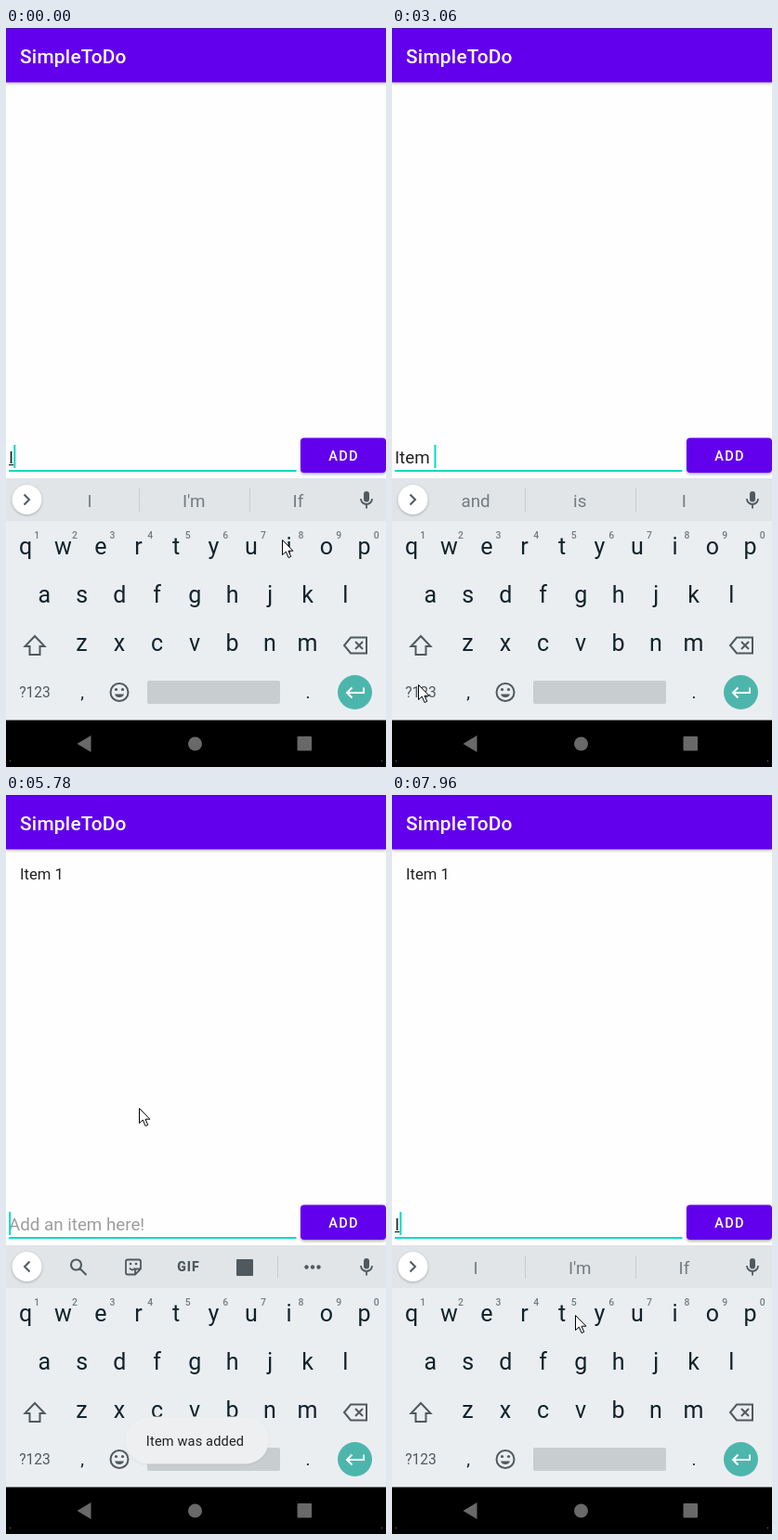
Recreate the animation shown at these times as an HTML page with a canvas. Size 409 by 796 pixels, loop 8000 ms.

```html
<!DOCTYPE html>
<html lang="en">
<head>
<meta charset="utf-8">
<title>To-do list</title>
<style>
html, body { margin: 0; width: 100%; height: 100%; overflow: hidden; background: #fefefe; }
canvas { display: block; width: 409px; height: 796px; }
</style>
</head>
<body>
<canvas id="stage" width="409" height="796"></canvas>
<script>
const ctx = document.getElementById('stage').getContext('2d');
const LOOP = 8000;
const PURPLE = '#6200ee', TEAL = '#03dac5', INK = '#11232a', ICON = '#50595e', MUTED = '#747b7f';
const FIELD_X = 3, STEP = 40.5;

const BURSTS = [[0, 1140, 10], [1290, 2190, 8], [2340, 3060, 6], [3180, 3330, 2],
  [3450, 3960, 5], [4110, 4350, 3], [4500, 5350, 7], [5780, 5780, 1],
  [6090, 6870, 7], [7020, 7020, 1], [7170, 7410, 3], [7690, 7960, 3]];
const TICKS = BURSTS.flatMap(([a, b, n]) =>
  Array.from({ length: n }, (_, i) => n > 1 ? a + (b - a) * i / (n - 1) : a));

// Input events: time, field text, suggestions (null shows the toolbar), key layout.
const EVENTS = [
  [0, 'I', ['I', "I'm", 'If'], 'lower'],
  [480, 'It', ['It', "It's", 'Its'], 'lower'],
  [860, 'Ite', ['Ite', '*It', "It's"], 'lower'],
  [1540, 'Item', ['Item', 'Items', "Item's"], 'lower'],
  [2050, 'Item ', ['and', 'is', 'I'], 'lower'],
  [3180, 'Item ', ['and', 'is', 'I'], 'symbols'],
  [3700, 'Item 1', [], 'symbols'],
  [4780, '', null, 'lower'],
  [7020, '', null, 'upper'],
  [7690, 'I', ['I', "I'm", 'If'], 'lower']
];
const ADDED = 4780;

const POINTER = [
  [0, 297, 551], [120, 290, 552], [400, 180, 556], [520, 180, 556], [800, 98, 556],
  [960, 98, 556], [1140, 190, 563], [1290, 303, 634], [1440, 322, 656], [1600, 322, 656],
  [1950, 225, 708], [2190, 225, 708], [2800, 28, 712], [3060, 28, 707], [3180, 28, 707],
  [3330, 25, 690], [3450, 23, 643], [3600, 19, 557], [3960, 19, 557], [4350, 335, 452],
  [4500, 355, 455], [4830, 355, 455], [5350, 143, 337], [5780, 143, 337],
  [6480, 32, 664], [7020, 32, 664], [7410, 294, 553], [7690, 294, 553], [7960, 197, 560]
];

const clamp = v => Math.max(0, Math.min(1, v));
const latest = (list, t, key = v => v) => list.filter(v => key(v) <= t).pop();

function pointerAt(t) {
  const i = POINTER.findIndex(p => p[0] > t);
  if (i < 0) return POINTER[POINTER.length - 1].slice(1);
  const [t0, x0, y0] = POINTER[i - 1], [t1, x1, y1] = POINTER[i];
  const u = (t - t0) / (t1 - t0), e = u * u * (3 - 2 * u);
  return [x0 + (x1 - x0) * e, y0 + (y1 - y0) * e];
}

function rect(x, y, w, h, color, r = 0) {
  ctx.fillStyle = color;
  ctx.beginPath();
  ctx.roundRect(x, y, w, h, r);
  ctx.fill();
}
function disc(x, y, r, color) {
  ctx.fillStyle = color;
  ctx.beginPath();
  ctx.arc(x, y, r, 0, Math.PI * 2);
  ctx.fill();
}
function text(s, x, y, size, color, { weight = 400, align = 'center', spacing = 0 } = {}) {
  ctx.font = `${weight} ${size}px Roboto, sans-serif`;
  ctx.letterSpacing = spacing + 'px';
  ctx.textAlign = align;
  ctx.fillStyle = color;
  ctx.fillText(s, x, y);
}
// Draws an SVG path relative to (x, y).
function shape(d, x, y, { fill, stroke, width = 2 } = {}) {
  const path = new Path2D(d);
  ctx.save();
  ctx.translate(x, y);
  if (fill) { ctx.fillStyle = fill; ctx.fill(path); }
  if (stroke) { ctx.strokeStyle = stroke; ctx.lineWidth = width; ctx.stroke(path); }
  ctx.restore();
}
function withShadow(color, blur, dy, draw) {
  ctx.save();
  ctx.shadowColor = color;
  ctx.shadowBlur = blur;
  ctx.shadowOffsetY = dy;
  draw();
  ctx.restore();
}

function drawApp(t, state) {
  rect(0, 0, 409, 796, '#fefefe');
  withShadow('rgba(0,0,0,.25)', 3, 1, () => rect(0, 0, 409, 58.5, PURPLE));
  rect(0, 0, 409, 1, '#4b12b0');
  text('SimpleToDo', 15, 38, 20.83, '#fff', { weight: 500, align: 'left', spacing: 0.26 });
  if (t >= ADDED) text('Item 1', 15, 91, 16.66, '#212121', { align: 'left' });

  const [since, value] = state;
  text(value || 'Add an item here!', FIELD_X, 469, 18.75, value ? '#212121' : '#9d9d9d', { align: 'left' });
  const end = FIELD_X + ctx.measureText(value).width;
  if (value && !/[ 1]/.test(value)) rect(FIELD_X, 470, end - FIELD_X, 1.2, '#212121');
  rect(FIELD_X, 476, 309.5, 2, TEAL);
  const blinkStart = value === '' ? ADDED : since;
  if ((t - blinkStart) % 1000 < 500) rect(end + 0.2, 449, 2, 25, TEAL);

  withShadow('rgba(0,0,0,.35)', 3, 1.5, () => rect(317, 441.5, 92, 37.5, PURPLE, 4));
  text('ADD', 363.5, 466, 14.58, '#fff', { weight: 500, spacing: 1.3 });
}

function drawToolbar() {
  ctx.strokeStyle = ICON;
  shape('M5.5 0A5.5 5.5 0 1 1-5.5 0A5.5 5.5 0 1 1 5.5 0M4 4L11 11', 75.5, 506, { stroke: ICON, width: 2.1 });
  shape('M-6-8H6Q8-8 8-6V2L2 8H-6Q-8 8-8 6V-6Q-8-8-6-8ZM8 2H4Q2 2 2 4V8M-4 1Q-1 5 2 1', 137, 508.5,
    { stroke: ICON, width: 1.8 });
  disc(134, 505, 1.3, ICON);
  disc(140, 505, 1.3, ICON);
  text('GIF', 196.5, 513, 14, ICON, { weight: 900, spacing: 1 });
  rect(248, 500, 18, 18, ICON, 1);
  rect(292, 497, 1, 23, '#c8cdd0');
  for (const x of [323.5, 330, 336.5]) disc(x, 508.5, 2.2, ICON);
}

function drawStrip(words) {
  rect(0, 485, 409, 46, '#e1e5e8');
  withShadow('rgba(0,0,0,.25)', 3, 1, () => disc(22.5, 508, 16, '#fff'));
  shape(words ? 'M-3-5.5L2.5 0L-3 5.5' : 'M3-5.5L-2.5 0L3 5.5', 22.5, 508, { stroke: ICON });
  if (!words) drawToolbar();
  else if (words.length) {
    words.forEach((w, i) => {
      const bold = w[0] === '*';
      text(w.replace('*', ''), 90 + i * 112.2, 516, 18.75, bold ? '#000' : MUTED, { weight: bold ? 700 : 400 });
    });
    rect(143, 496, 1, 25, '#c8cdd0');
    rect(262, 496, 1, 25, '#c8cdd0');
  }
  rect(385, 499, 6, 11.5, ICON, 3);
  shape('M-6-1A6 6 0 0 0 6-1M0 5V9.5', 388, 508, { stroke: ICON, width: 1.8 });
}

const keyRow = (keys, x, y, size = 25) =>
  [...keys].forEach((k, i) => text(k, x + i * STEP, y, size, INK));

function drawKeys(layout) {
  rect(0, 531, 409, 214.5, '#eaeef1');
  const symbols = layout === 'symbols', upper = layout === 'upper';
  if (symbols) {
    keyRow('1234567890', 21, 569);
    keyRow('@#$_&-+()/', 21, 621);
    keyRow('*"\':;!?', 81.5, 673);
    text('=\\<', 31, 670, 15.6, ICON, { weight: 500 });
    text('ABC', 31, 721, 15.6, ICON);
    text('1 2', 122, 714, 13, ICON, { weight: 500 });
    text('3 4', 122, 727, 13, ICON, { weight: 500 });
  } else {
    const cased = s => upper ? s.toUpperCase() : s;
    keyRow(cased('qwertyuiop'), 21, 566.5);
    keyRow(cased('asdfghjkl'), 41.2, 619);
    keyRow(cased('zxcvbnm'), 81.5, 671);
    [...'1234567890'].forEach((d, i) => text(d, 33.3 + i * 40.6, 549.5, 10.4, MUTED, { weight: 500 }));
    shape('M0-10L10.5 1H5.5V10H-5.5V1H-10.5Z', 31, 665, { fill: upper ? ICON : null, stroke: ICON });
    text('?123', 31, 721, 15.6, ICON);
    ctx.strokeStyle = ICON;
    ctx.lineWidth = 2;
    ctx.beginPath();
    ctx.arc(122, 715.5, 9.5, 0, Math.PI * 2);
    ctx.stroke();
    disc(118.5, 712.5, 1.6, ICON);
    disc(125.5, 712.5, 1.6, ICON);
    shape('M-5 2A5.3 5.3 0 0 0 5 2Z', 122, 715.5, { fill: ICON });
  }
  shape('M-5-8.5H12V8.5H-5L-12 0ZM0-4L8 4M8-4L0 4', 376, 665, { stroke: ICON });
  text(',', 82, 722, 19, INK);
  text('.', 325, 722, 19, INK);
  rect(152, 703, 143, 25, '#c8cdd0', 2);
  disc(375.5, 715.5, 18.5, '#4db6ac');
  shape('M9.5-5.5V0H-8M-3-5.5L-8.5 0L-3 5.5', 375.5, 716, { stroke: '#fff' });
}

function drawNavigation() {
  rect(0, 745.5, 409, 51, '#000');
  const grey = '#696969';
  shape('M-7.5 0L7.5-9V9Z', 84, 771, { fill: grey });
  disc(203.5, 771, 7.5, grey);
  rect(313.5, 763, 15.5, 15.5, grey, 1);
  rect(4, 789, 1, 1, '#777');
  rect(404, 789, 1, 1, '#777');
}

function drawToast(t) {
  ctx.globalAlpha = clamp((t - 4850) / 200) * clamp((7250 - t) / 350);
  withShadow('rgba(0,0,0,.06)', 3, 1, () => rect(128, 669.5, 155, 51, '#edeff0', 25.5));
  text('Item was added', 203.5, 700.5, 14.58, '#212121', { spacing: 0.15 });
  ctx.globalAlpha = 1;
}

function drawPointer(t) {
  const [x, y] = pointerAt(t);
  shape('M0 0V16L3.8 12.6L6.6 19L9.2 17.8L6.5 11.7H11.4Z', Math.round(x) + 0.5, Math.round(y) + 0.5,
    { fill: '#fff', stroke: '#000', width: 1 });
}

function frame(now) {
  const t = latest(TICKS, now % LOOP);
  const state = latest(EVENTS, t, e => e[0]);
  drawApp(t, state);
  drawStrip(state[2]);
  drawKeys(state[3]);
  drawNavigation();
  drawToast(t);
  drawPointer(t);
  requestAnimationFrame(() => frame(performance.now() - start));
}
const start = performance.now();
frame(0);
</script>
</body>
</html>
```
